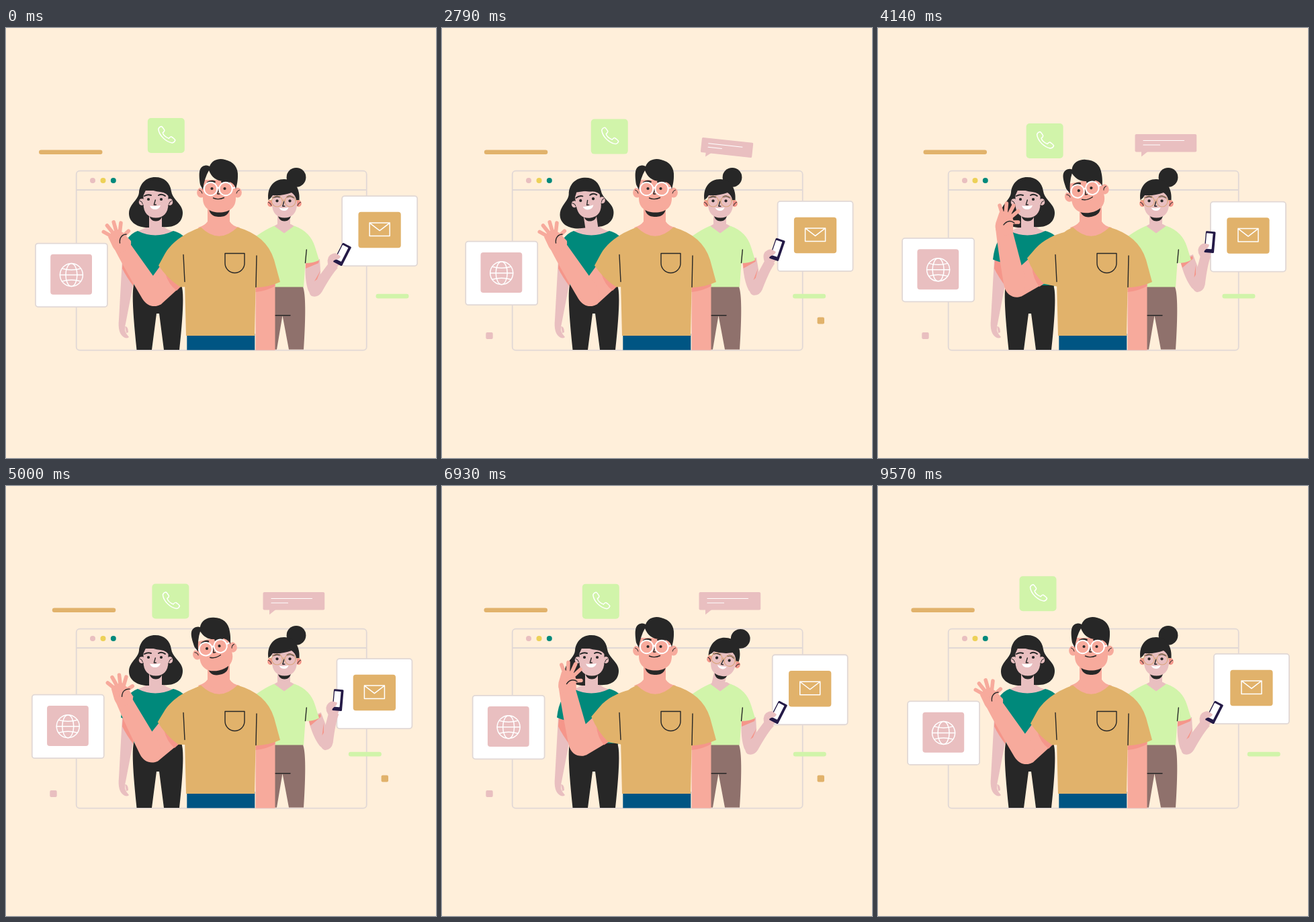
These frames come from a looping animation (640x640 px, 9.64 s). An HTML page:

```html
<!DOCTYPE html>
<html lang="en">
<head>
<meta charset="utf-8">
<title>Team greeting</title>
<style>
html, body { margin: 0; width: 100%; height: 100%; overflow: hidden; background: #ffefda; }
svg { display: block; width: 100%; height: 100%; }
.skin { fill: #f7aa9c; } .shade { fill: #f5968a; } .pink { fill: #e9bfc0; }
.ink { fill: #272727; } .teal { fill: #00897b; } .sand { fill: #e1b26b; }
.lime { fill: #d1f4aa; } .white { fill: #fff; }
.line, .icon, .glasses, .finger { fill: none; stroke-linecap: round; stroke-linejoin: round; }
.line { stroke: #272727; stroke-width: 1.4; }
.icon { stroke: #fff; stroke-width: 1.5; }
.finger { stroke: #f7aa9c; stroke-width: 5.6; }
.frame { stroke: #e1d8d5; stroke-width: 1.8; }
</style>
</head>
<body>
<svg viewBox="0 0 640 640">
  <!-- window -->
  <g class="frame" fill="none">
    <rect x="104.7" y="212.7" width="432" height="267" rx="5"/>
    <path d="M104.7 241H536.7"/>
  </g>
  <circle class="pink" cx="129" cy="227" r="4"/>
  <circle fill="#edd157" cx="144.5" cy="227" r="4"/>
  <circle class="teal" cx="159.8" cy="227" r="4"/>

  <!-- floating parts -->
  <rect id="barA" class="sand" y="181.5" width="94.5" height="6.4" rx="3.2"/>
  <rect id="barB" class="lime" y="395.8" width="49" height="6.6" rx="3.2"/>
  <rect id="dotA" class="sand" x="-5.2" y="-5" width="10.4" height="10" rx="2"/>
  <rect id="dotB" class="pink" x="-5.2" y="-5" width="10.4" height="10" rx="2"/>
  <g id="bubble">
    <rect class="pink" x="-9.5" y="-33.5" width="91.7" height="26.5" rx="2"/>
    <path class="pink" d="M0 -8V0L10 -8Z"/>
    <path class="icon" style="stroke-width:1.2" d="M3 -24H63.5M3 -17.5H27.5"/>
  </g>
  <g id="call">
    <rect class="lime" width="55" height="52" rx="5"/>
    <path class="icon" d="M16 16.5Q17 13 20.5 12.5Q22 13 25 18Q25.5 19.5 22.5 22Q23.5 27 31.5 30.500Q34 27.500 35.500 28Q40 31 41 33Q40 36.500 36.500 37C28 36 17 26.500 16 16.500Z"/>
  </g>
  <g id="web">
    <rect class="white frame" width="107" height="94.5" rx="4"/>
    <rect class="pink" x="22.3" y="16.3" width="61.8" height="60" rx="4"/>
    <g class="icon" transform="translate(53.5 47)">
      <circle r="17"/><ellipse rx="8.5" ry="17"/>
      <path d="M-17 0H17M-14 -9.5Q0 -5.5 14 -9.5M-14 9.5Q0 5.5 14 9.5"/>
    </g>
  </g>
  <g id="mail">
    <rect class="white frame" width="112" height="104" rx="4"/>
    <rect class="sand" x="24.3" y="23.7" width="63.3" height="53.5" rx="4"/>
    <path class="icon" d="M41 40H71V59.5H41ZL56 51.5L71 40"/>
  </g>

  <!-- woman on the left -->
  <path class="pink" d="M173 344L188 350L189 383L178 440Q174 451 183 460Q180 463 175 460Q166 454 168 434Z"/>
  <path class="pink" d="M177 444Q182 444 182 453L179 454Z"/>
  <path class="shade" d="M174 343L190 350V385Q179 370 173 358Z"/>
  <path class="pink" d="M213 294Q208 298 194 303L222 314L250 303Q238 300 233 294Z"/>
  <path class="teal" d="M196 302Q222 315 249 302Q265 306 272 320L262 385H190V350Q179 348 171 344.5Q175 309 196 302Z"/>
  <path class="ink" d="M190 383H261Q267 396 258 479H235L228 425H224L217 479H194.500Q186 400 190 383Z"/>
  <g id="headL">
    <path id="bob" class="ink" d="M222 222C208 222 199 232 198 245C197 256 183 262 183 276C183 291 199 298 214 297L233 296C252 298 263 289 263 275C263 262 248 256 246 243C244 230 236 222 222 222Z"/>
    <path class="pink" d="M213 277H232V299Q222 303 213 299Z"/>
    <g id="faceL"></g>
    <path class="ink" d="M201 255C199 238 208 226 222 226C238 226 246 238 244 254Q240 245 230 244Q218 243 210 237Q206 247 201 255Z"/>
    <path class="white" d="M214 264.500Q222 266 230 264Q228 270 222 270T214 264.500Z"/>
  </g>

  <!-- woman on the right -->
  <g id="armR">
    <path class="pink" d="M446 346L467 344L468 362L467 395Q456 402 450 391Q444 375 446 346Z"/>
    <path class="shade" d="M446 348L466 346L465 350L446 358Z"/>
    <g id="foreR">
      <path class="pink" d="M481 349L494 357Q485 366 470 393Q464 402 455 399Q448 394 455 384Z"/>
      <path class="shade" d="M468 361L459 377L463 374Z"/>
      <path class="pink" d="M479 351Q477 339 486 336L497 338L499 347Q495 357 486 359Z"/>
      <g transform="translate(500.5 337) rotate(27)">
        <rect fill="#241a47" x="-7.3" y="-16" width="14.6" height="32" rx="1.5"/>
        <rect class="white" x="-6" y="-13" width="9.5" height="23.5" rx=".8"/>
      </g>
      <path class="pink" d="M486 336Q491 334 494 337L498 340Q497 344 490 345L484 348Z"/>
    </g>
  </g>
  <path class="pink" d="M404 292L397 296L414 310L431 296L424 292Z"/>
  <path class="lime" d="M399 294.500L414 305.500L429 294.500Q453 303 460 326L466 345.500Q457 350 445.500 350L443 386H372V310Q386 300 399 294.500Z"/>
  <path class="line" d="M447.300 330L445.500 349.500"/>
  <path fill="#8f716c" d="M386 385.500H442Q448 400 443 478.500H421L411.500 428L403 478.500H386Z"/>
  <path class="line" d="M399 427.700H423"/>
  <g id="headR">
    <circle class="ink" cx="432" cy="222.300" r="14.400"/>
    <path class="pink" d="M404 276H423V297Q414 302 404 297Z"/>
    <g id="faceR"></g>
    <path class="ink" d="M390.500 256C388 238 398 225 414 225C430 225 438 240 436.500 256H432Q431 249 425 245Q412 250 397 249Q395 253 390.500 256Z"/>
    <path class="white" d="M406.500 267.500Q414 269 420.500 267Q419 272 414 272T406.500 267.500Z"/>
  </g>

  <!-- man -->
  <path class="skin" d="M371.500 380H400.500V479.500H371.500Z"/>
  <path class="shade" d="M371.500 384L400.500 379V384Q389 391 371.500 393Z"/>
  <rect fill="#005583" x="269.300" y="455" width="101" height="24.300"/>
  <g id="upper">
    <path class="skin" d="M218 370L234 348L265 380L231 411Q216 418 205 405Z"/>
    <path class="shade" d="M237 365L262 383L254 391Q242 382 237 365Z"/>
    <g id="fore">
      <path class="skin" d="M160 326Q174 354 203 403C211 416 223 416 231 411C239 399 230 380 219 369L184 320Z"/>
      <g id="hand">
        <path class="skin" d="M152 311L157 304L166 300L175 305L186 317Q187 325 182 330L170 335Q163 333 159 326Z"/>
        <path id="fingers" class="finger"/>
        <path class="line" d="M169.500 320C168.500 313 172 307.500 179 307"/>
      </g>
    </g>
    <path class="sand" d="M292 296C262 306 244 322 236 337L227 353.500Q241 374 259.500 385.500L285 385L292 310Z"/>
  </g>
  <path class="skin" d="M300 288Q296 294 286 297L300 316H334L348 297Q337 295 333 288Z"/>
  <path class="sand" d="M290 296.500Q317 323 344.500 296.500Q388 309 399 345L408 378Q392 385.500 371.500 386.500L370 458H268L266 378L263 320Q272 304 290 296.500Z"/>
  <path class="line" d="M264 337.500L266 377.500M373 339L372 385.500M326 335.500H355V350A14.500 14.500 0 0 1 326 350Z"/>
  <path class="skin" d="M300 262H333V296Q317 306 300 296Z"/>
  <g id="headM">
    <g id="faceM"></g>
    <path class="ink" d="M293 241L289 233C287 218 286 206 297 204.500Q301 204 303 206C307 196 317 193.500 326 196C339 199 346 208 345 221C345 229 343 236 342 240Q340 228 325 228C313 228 306 222 302 212Q295 224 293 241Z"/>
    <path class="line" d="M308.500 253Q316 256.500 324.500 252.500"/>
  </g>
</svg>
<script>
const LOOP = 9640, TAU = Math.PI * 2;
const $ = id => document.getElementById(id);
const move = (id, value) => $(id).setAttribute('transform', value);
const turn = (id, angle, x, y) => move(id, `rotate(${angle} ${x} ${y})`);

// ears, chin shadow, jaw, eyes, brows and nose around a centre line
function face(id, { cx, y, half, jaw, skin, ear, earR, chin, drop, browY, browW }) {
  const eye = cx - 1.5;
  const sides = [-1, 1].map(s => {
    const ex = cx + s * (half + 2.500), bx = eye + s * 10.500;
    return { ears: `<ellipse class="${ear}" cx="${ex}" cy="${y + earR * .8}" rx="${earR * .85}" ry="${earR}"/>
      <path class="line" style="stroke-width:1" d="M${ex + s * 3} ${y + 2}q${-s * 4} 1 ${-s * 4.500} 5"/>`,
      eyes: `<circle class="ink" cx="${eye + s * 9.500}" cy="${y}" r="2.100"/>
      <path class="line" style="stroke-width:${browW}" d="M${bx - 5} ${browY + (s < 0 ? 1 : 0)}q5 -3 10 ${s < 0 ? -1 : 1}"/>` };
  });
  const pick = key => sides.map(s => s[key]).join('');
  $(id).innerHTML = `
    <path class="ink" d="M${cx - chin} ${jaw - 11}h${2 * chin}C${cx + chin} ${jaw + drop - 4} ${cx + chin * .6} ${jaw + drop} ${cx} ${jaw + drop}S${cx - chin} ${jaw + drop - 4} ${cx - chin} ${jaw - 11}Z"/>
    ${pick('ears')}
    <path class="${skin}" d="M${cx - half} ${y - 13}h${2 * half}V${jaw - 21}C${cx + half} ${jaw - 7} ${cx + half * .6} ${jaw} ${cx} ${jaw}S${cx - half} ${jaw - 7} ${cx - half} ${jaw - 21}Z"/>
    ${pick('eyes')}
    <path class="line" d="M${eye + .800} ${y + 1}l-2 7h3"/>`;
}

function glasses(id, cx, y, gap, r, color, width) {
  const lens = s => `<circle cx="${cx + s * gap}" cy="${y}" r="${r}"/>
    <path d="M${cx + s * (gap + r)} ${y - 1}l${s * 5} -1"/>`;
  $(id).innerHTML += `<g class="glasses" stroke="${color}" stroke-width="${width}">
    ${lens(-1)}${lens(1)}<path d="M${cx - gap + r} ${y - 1}q${gap - r} -2 ${2 * (gap - r)} 0"/></g>`;
}

const woman = { half: 18.500, jaw: 282.500, skin: 'pink', earR: 5, chin: 10.500, drop: 5, browW: 2 };
face('faceL', { ...woman, cx: 223, y: 255, ear: 'pink', browY: 249 });
face('faceR', { ...woman, cx: 414.500, y: 257.300, ear: 'shade', browY: 251.500 });
face('faceM', { cx: 317.500, y: 239, half: 24.500, jaw: 274.500, skin: 'skin', ear: 'skin', earR: 7.500,
  chin: 16, drop: 6.500, browY: 229, browW: 2.800 });
glasses('faceR', 413.200, 258, 9.800, 8, '#dba77e', 1.200);
glasses('faceM', 315.800, 239.500, 11.200, 9.700, '#fff', 2);

// four fingers and a thumb fanned from the palm
let fan = '';
for (let i = 0; i < 5; i++) {
  const a = (-61 + 22.500 * i + (i === 4 ? 17 : 0)) * Math.PI / 180;
  const len = 26 + (i < 4 ? 2.500 * Math.sin(i * Math.PI / 3) : -6);
  fan += `M${168 + 8 * Math.sin(a)} ${316 - 8 * Math.cos(a)}L${168 + len * Math.sin(a)} ${316 - len * Math.cos(a)}`;
}
$('fingers').setAttribute('d', fan);

// eased 0 to 1 after a start time
function ramp(t, from, len = 1300) {
  const u = Math.min(1, Math.max(0, (t - from) / len));
  return (1 - Math.cos(Math.PI * u)) / 2;
}
const pulse = (t, on, off, len) => ramp(t, on, len) - ramp(t, off, len);

// one slow ellipse per loop
function float(id, t, x, rx, peakX, y, ry, peakY) {
  const swing = peak => Math.cos(TAU * (t - peak) / LOOP);
  move(id, `translate(${x + rx * swing(peakX)} ${y + ry * swing(peakY)})`);
}

function draw(t) {
  float('web', t, 41, 6, 8000, 315.800, 5.700, 900);
  float('mail', t, 496.500, 5.500, 1300, 253.800, 5, 3700);
  float('call', t, 214.500, 7.500, 3200, 139.400, 7.600, 6000);

  const half = Math.min(t, LOOP - t) / (LOOP / 2);
  const slide = (half + Math.sin(half * Math.PI / 2)) / 2;
  $('barA').setAttribute('x', 49 + 20.200 * slide);
  $('barB').setAttribute('x', 550.500 - 41.500 * slide);

  const dotA = pulse(t, 300, 3300, 600) + pulse(t, 4350, 7300, 600);
  const dotB = pulse(t, 1700, 5250, 600) + pulse(t, 6350, 8300, 600);
  move('dotA', `translate(563.800 435.400) scale(${dotA})`);
  move('dotB', `translate(70.500 458) scale(${dotB})`);

  const size = pulse(t, 2350, 7700, 600);
  const tilt = 12 * (1 - ramp(t, 2350, 900) + ramp(t, 7700, 600));
  move('bubble', `translate(392 191.500) rotate(${tilt}) scale(${size})`);

  // each head takes its turn; the bob hangs back towards upright
  const nod = -8.500 * pulse(t, 700, 2700);
  turn('headL', nod, 222, 295);
  turn('bob', -.6 * nod, 222, 222);
  turn('headM', -12.500 * pulse(t, 3000, 4800), 317, 277);
  turn('headR', 12 * pulse(t, 5300, 8100), 414, 283);

  // three waves, then rest
  const turns = Math.min(3, Math.max(0, (t - 200) / 2600));
  const wave = (1 - Math.cos(TAU * turns)) / 2;
  turn('upper', 12.500 * wave, 275, 325);
  turn('fore', 8.500 * wave, 220, 395);
  turn('hand', 23 * wave, 172, 322);

  const lift = -18 * pulse(t, 2250, 5400);
  turn('armR', lift, 446, 335);
  turn('foreR', -22 * pulse(t, 2250, 5100) - lift, 459, 390);
}

const start = performance.now();
function tick() {
  draw((performance.now() - start) % LOOP);
  requestAnimationFrame(tick);
}
draw(0);
requestAnimationFrame(tick);
</script>
</body>
</html>
```
